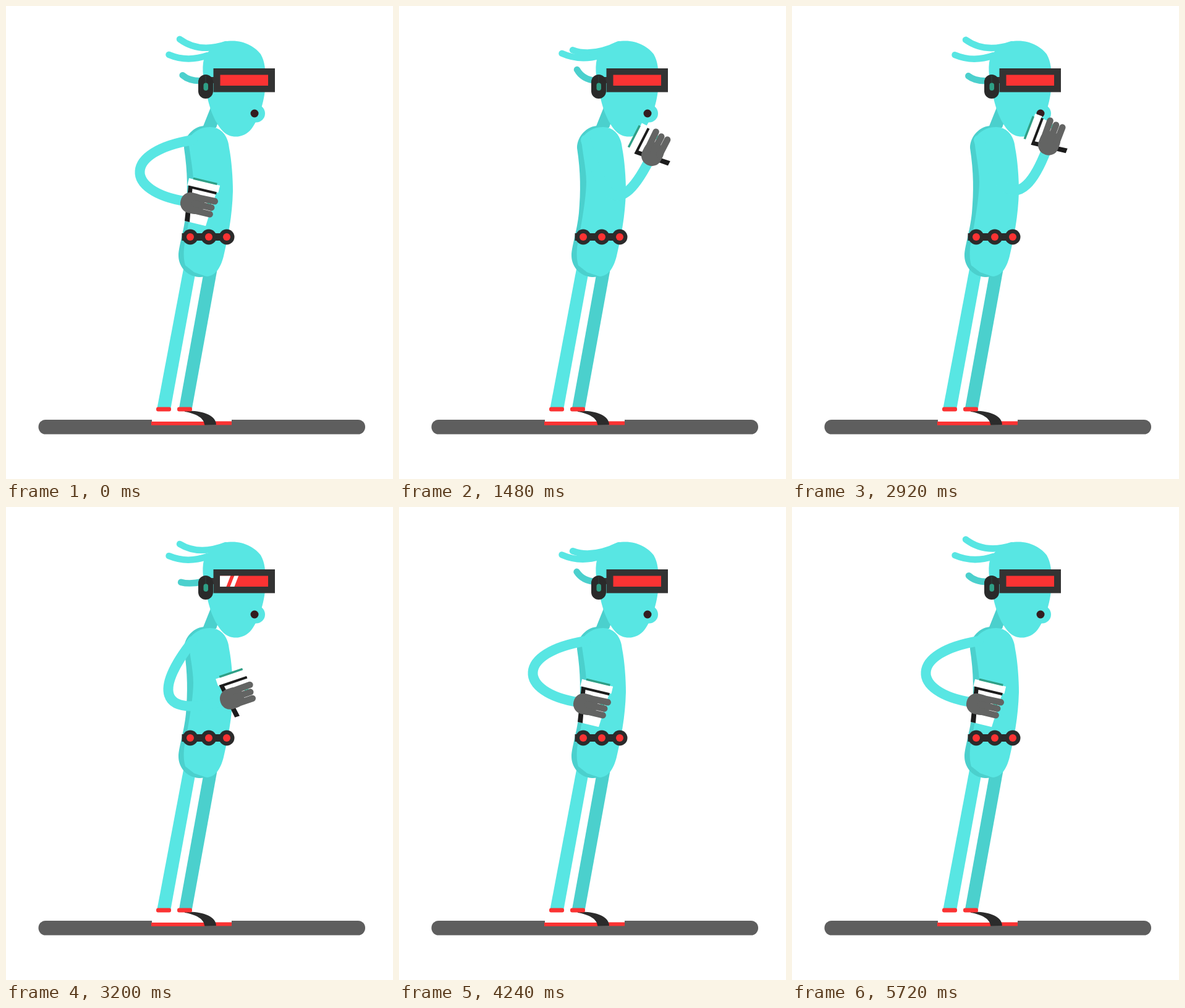
Write an HTML page with a canvas that moves like this. It is 626 by 766 pixels and loops after 5.76 s.

```html
<!DOCTYPE html>
<html>
<head>
<meta charset="utf-8">
<style>
html, body { margin: 0; width: 100%; height: 100%; overflow: hidden; background: #fff; }
canvas { display: block; }
</style>
</head>
<body>
<canvas id="stage" width="626" height="766"></canvas>
<script>
const g = document.getElementById('stage').getContext('2d');
const LOOP = 5760, HALF = LOOP / 2;
const SKIN = '#58e6e3', SHADE = '#4bd0cd', RED = '#fb3333', DARK = '#2b2b2b',
      GLOVE = '#636463', GREEN = '#2f9f86', INK = '#1c1c1c', WHITE = '#fff';

const fill = (color, d) => { g.fillStyle = color; g.fill(new Path2D(d)); };
const line = (color, width, d, cap = 'round') => {
  g.strokeStyle = color; g.lineWidth = width; g.lineCap = cap;
  g.stroke(new Path2D(d));
};
const box = (color, x, y, w, h, r = 0) => {
  g.fillStyle = color; g.beginPath(); g.roundRect(x, y, w, h, r); g.fill();
};
const dot = (color, x, y, r) => {
  g.fillStyle = color; g.beginPath(); g.arc(x, y, r, 0, 7); g.fill();
};

// Periodic sway through [time, height] turning points.
function sway(points, t) {
  t %= HALF;
  const n = points.length;
  let i = points.findIndex(p => p[0] > t);
  if (i < 0) i = n;
  const [t0, a] = points[(i + n - 1) % n], [t1, b] = points[i % n];
  const wrap = x => (x + HALF) % HALF;
  const k = wrap(t - t0) / wrap(t1 - t0);
  return a + (b - a) * (1 - Math.cos(Math.PI * k)) / 2;
}
const TOP = [[340, 60], [680, 57], [1420, 71.5], [2530, 47]];
const MID = [[200, 80], [850, 70.5], [1330, 77.5], [2150, 69]];
const LOW = [[440, 123], [1650, 102], [2400, 110], [2700, 109.5]];

// Arm poses: time, hand x, y, tilt, then the two control points of the arm.
const POSES = [
  [980, 305, 320, 13.5, 190, 235, 190, 300],
  [1270, 369, 308.5, -18.9, 245, 290, 240, 345],
  [1400, 417, 273, -43, 295, 290, 310, 360],
  [1480, 411.5, 236.7, -62.8, 325, 290, 348, 360],
  [1760, 435, 183.3, -78.4, 325, 296, 405, 315]
];
const RETURN = 4470;

function armPose(t) {
  const last = POSES.length - 1;
  const u = Math.min(t, RETURN - t);
  if (u <= POSES[0][0]) return POSES[0];
  if (u >= POSES[last][0]) return POSES[last];
  const i = POSES.findIndex(p => p[0] > u) - 1;
  const p = POSES[i], q = POSES[i + 1], span = q[0] - p[0], k = (u - p[0]) / span;
  const slope = (j, c) => j < 1 || j >= last ? 0 :
    (POSES[j + 1][c] - POSES[j - 1][c]) / (POSES[j + 1][0] - POSES[j - 1][0]);
  return p.map((a, c) => a + (q[c] - a) * k * k * (3 - 2 * k) +
    span * k * (1 - k) * ((1 - k) * slope(i, c) - k * slope(i + 1, c)));
}

function drawLegs() {
  box('#5e5e5e', 52.5, 670, 528.5, 23.5, 11.5);
  fill(SHADE, 'M280 651L301 651L342 425L320 430Z');
  fill(SKIN, 'M244.5 651L266.5 651L306.5 432L312 400L290 410Z');
  box(WHITE, 236, 657, 129, 18);
  box(RED, 235, 673, 87, 6);
  box(RED, 339, 672.5, 26, 6);
  fill(DARK, 'M289 656C315 654 340 662 340 678L321 678.5C321 668 308 660 289 657Z');
  box(RED, 243, 649.5, 24, 7, 3);
  box(RED, 277, 649.5, 24, 7, 3);
}

function drawBody() {
  fill(SHADE, 'M332 162L318 197L340 197L344 185Z');
  fill(SHADE, 'M288 230C288 210 305 194 322 194L340 300L335 430Q325 440 312 439' +
    'C290 437 279 420 279 404C279 390 288 365 291 335C294 300 294 270 288 230Z');
  fill(SKIN, 'M300 209C310 197 330 193 341 198C355 204 360 218 361 230' +
    'C365 250 367 280 367 300C366 340 359 375 352 405C347 425 338 437 325 438' +
    'C315 435 306 432 304 431L290 420C287 410 287 395 289 385' +
    'C294 360 303 310 303 285C303 262 296 235 295 215Z');
  line(DARK, 12, 'M284.5 374H357', 'butt');
  for (const x of [298, 328, 357]) {
    dot(DARK, x, 374, 12.5);
    dot(RED, x, 374, 6);
  }
}

function drawHead(t) {
  const a = sway(TOP, t), b = sway(MID, t), c = sway(LOW, t);
  line(SHADE, 10.5, `M${288 - (c - 103) * .26} ${c}Q297 ${119 + (c - 103) * .35} 318 121`);
  line(SKIN, 10.5, `M281 ${a}Q312 ${77 + (a - 54.5) * .36} 356 62`);
  line(SKIN, 10.5, `M263.5 ${b}Q293 ${86 + (b - 71) * .69} 326 80`);
  fill(SKIN, 'M352 58C380 52 402 65 412 78C419 90 420 105 420 125' +
    'C418 160 407 186 397 199C385 214 364 216 351 203C335 186 328 160 324 140' +
    'C318 115 316 95 322 80Q335 64 352 58Z');
  dot(SKIN, 404.5, 174, 14.5);
  dot('#341c1f', 402, 174, 6.5);

  box('#333', 330, 115, 8, 10);
  box('#2a2a2a', 311, 111, 24, 39, 12);
  line('#25453e', 1, 'M323 112V125');
  box(GREEN, 319.5, 124.5, 7.5, 12.5, 3.75);
  box('#333', 335.5, 101, 99.5, 38.5);
  box(RED, 346.5, 111.5, 77.5, 17.5);
  drawGlint(346 + (t % HALF - 240) * .375);
}

function drawGlint(x) {
  if (x < 346 || x > 465) return;
  g.save();
  g.beginPath();
  g.rect(346, 111.5, 78, 17.5);
  g.clip();
  for (const [left, right] of [[31, 13], [7, 0]])
    fill(WHITE, `M${x - left} 111H${x - right}L${x - right - 7} 129H${x - left - 7}Z`);
  g.restore();
}

function drawArm(t) {
  const [, x, y, tilt, ax, ay, bx, by] = armPose(t);
  const r = tilt * Math.PI / 180;
  line(SKIN, 16, `M302 217C${ax} ${ay} ${bx} ${by} ` +
    `${x - 15 * Math.cos(r)} ${y - 15 * Math.sin(r)}`);
  g.save();
  g.translate(x, y);
  g.rotate(r);
  // Cup
  fill(WHITE, 'M-16.5 -26H30L26 31H-9Z');
  box(WHITE, -18.3, -38, 51.5, 12);
  box(GREEN, -11.5, -41, 39.5, 3.5);
  fill(INK, 'M-16.5 -26.5H30.5V-22.5H-9L-.8 31H-9Z');
  // Glove
  box(GLOVE, -23, -16.5, 39, 33.5, 16);
  line(GLOVE, 10.5, 'M-4 -10.5L31 -11.3M0 0H28M0 11H28');
  line(GREEN, 1, 'M20 -5.5H27', 'butt');
  g.restore();
}

function frame(now) {
  const t = now % LOOP;
  g.fillStyle = WHITE;
  g.fillRect(0, 0, 626, 766);
  drawLegs();
  drawBody();
  drawHead(t);
  drawArm(t);
  requestAnimationFrame(frame);
}
frame(0);
</script>
</body>
</html>
```
